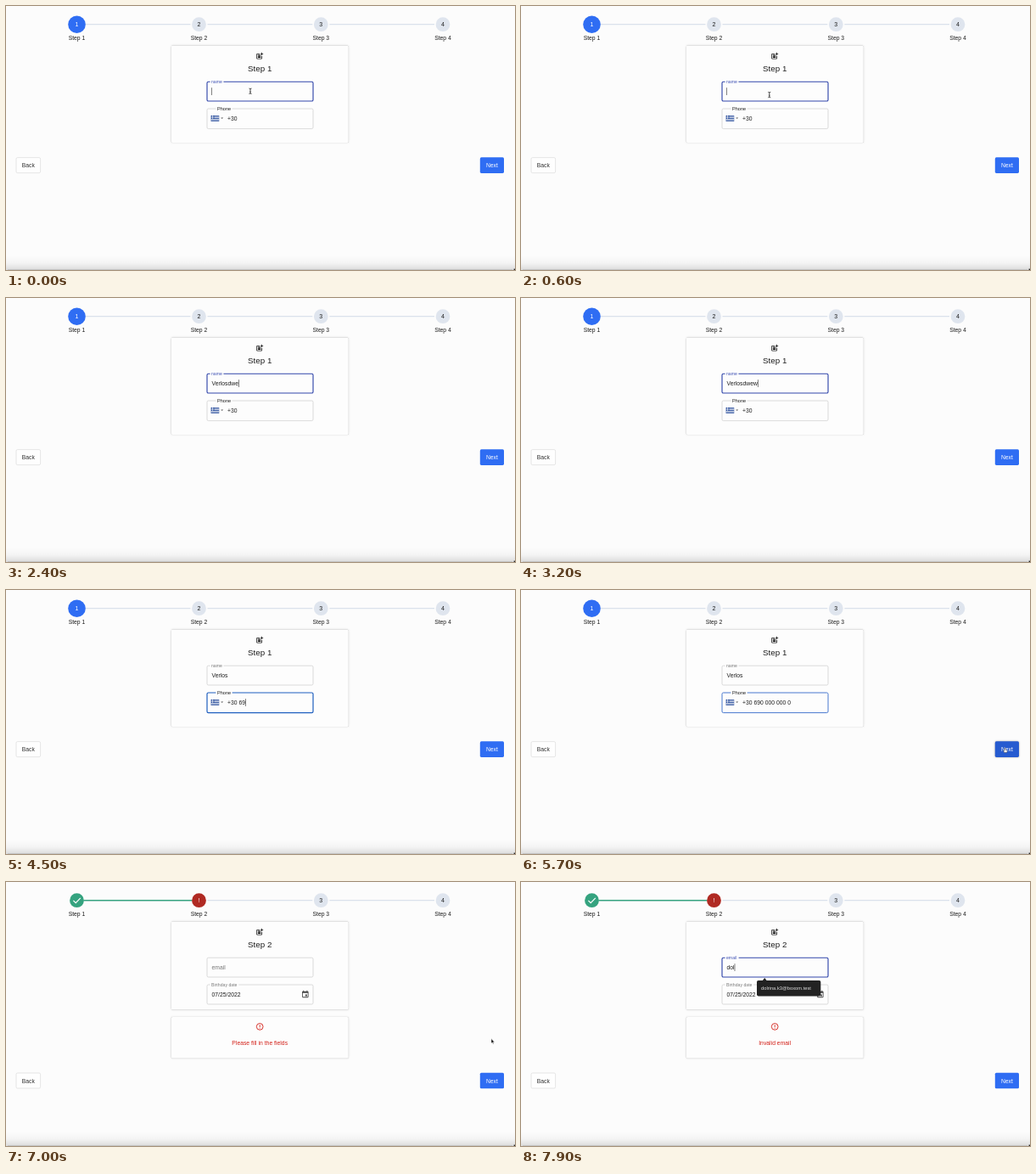
These frames come from a looping animation (600x311 px, 8 s). An HTML page:

```html
<!DOCTYPE html>
<html lang="en">
<head>
<meta charset="utf-8">
<title>Stepper form</title>
<style>
  html, body { margin: 0; width: 100%; height: 100%; overflow: hidden; background: #fcfcfc; }
  svg { display: block; width: 600px; height: 311px; font: 6.75px "Liberation Sans", Arial, sans-serif; letter-spacing: .005em; }
  .paper { fill: #fdfdfd; filter: drop-shadow(0 .6px .4px rgba(0,0,0,.3)) drop-shadow(0 .3px .9px rgba(0,0,0,.14)); }
  .raised { filter: drop-shadow(0 .8px 1px rgba(0,0,0,.35)); }
</style>
</head>
<body>
<svg id="stage" viewBox="0 0 600 311"></svg>
<script>
const LOOP = 8000;
const BLUE = '#2f6df3', HOVER = '#265bd0', INDIGO = '#3247ab', PHONE_BLUE = '#1f5fbf';
const GREEN = '#35a37f', RED = '#b02a23', ERROR = '#d32018', PALE = '#dfe5ee';
const INK = '#1c1c1c', GREY = '#777', BORDER = '#c4c4c4', PAPER = '#fdfdfd';
const STEP_X = [83.5, 227.5, 371.3, 515], STEP_Y = 21.7;

const stage = document.getElementById('stage');

function set(node, attrs) {
  for (const k in attrs) node.setAttribute(k, attrs[k]);
  return node;
}
function add(parent, tag, attrs = {}) {
  return parent.appendChild(set(document.createElementNS('http://www.w3.org/2000/svg', tag), attrs));
}
const group = (parent = stage) => add(parent, 'g');
const rect = (p, x, y, width, height, attrs) => add(p, 'rect', { x, y, width, height, ...attrs });
const path = (p, d, attrs) => add(p, 'path', { d, ...attrs });
function text(p, x, y, str, attrs) {
  const node = add(p, 'text', { x, y, fill: INK, ...attrs });
  node.textContent = str;
  return node;
}
const mid = { 'text-anchor': 'middle' };
const show = (node, on) => node.setAttribute('visibility', on ? 'inherit' : 'hidden');
const clamp = v => Math.max(0, Math.min(1, v));
const last = (table, t) => table.filter(row => row[0] <= t).pop();

// Position on a polyline of [time, x, y]
function along(points, t) {
  let i = points.findIndex(p => p[0] > t);
  if (i < 0) return points[points.length - 1].slice(1);
  if (i === 0) return points[0].slice(1);
  const a = points[i - 1], b = points[i], k = (t - a[0]) / (b[0] - a[0]);
  return [a[1] + (b[1] - a[1]) * k, a[2] + (b[2] - a[2]) * k];
}

// Bottom shade
const defs = add(stage, 'defs');
const shade = add(defs, 'linearGradient', { id: 'shade', x1: 0, y1: 0, x2: 0, y2: 1 });
add(shade, 'stop', { offset: 0, 'stop-color': '#000', 'stop-opacity': 0 });
add(shade, 'stop', { offset: .5, 'stop-color': '#000', 'stop-opacity': .03 });
add(shade, 'stop', { offset: 1, 'stop-color': '#000', 'stop-opacity': .13 });
rect(stage, 0, 294, 600, 17, { fill: 'url(#shade)' });
rect(stage, 2, 310.3, 595, .7, { fill: '#bbb' });
rect(stage, 598.6, 309.6, 1.4, 1.4, { fill: '#222' });

// Stepper
const rails = STEP_X.slice(1).map((x, i) =>
  rect(stage, STEP_X[i] + 10, STEP_Y - .55, x - STEP_X[i] - 20, 1.1, { fill: '#d5dde9' }));
const doneRail = rect(stage, STEP_X[0] + 8, STEP_Y - .75, STEP_X[1] - STEP_X[0] - 16, 1.5, { fill: GREEN });
const dots = STEP_X.map((x, i) => {
  const circle = add(stage, 'circle', { cx: x, cy: STEP_Y, r: 8.4 });
  const num = text(stage, x, STEP_Y + 2.5, i + 1, { ...mid, 'font-size': 7 });
  text(stage, x, 40, 'Step ' + (i + 1), mid);
  return { circle, num };
});
const tick = path(stage, 'M79.4 21.9l2.8 2.8 5.6-5.8', { fill: 'none', stroke: '#fff', 'stroke-width': 1.2 });

function paintDot(i, fill, color, r, label) {
  set(dots[i].circle, { fill, r });
  dots[i].num.setAttribute('fill', color);
  dots[i].num.textContent = label;
}

// Card shared by both steps
const card = rect(stage, 194.8, 46.5, 209, 114.5, { rx: 1.6, class: 'paper' });
path(stage, 'M17 19.2H5V7h7V5H5c-1.1 0-2 .9-2 2v12c0 1.1.9 2 2 2h12c1.1 0 2-.9 2-2v-7h-2zM19 2h-2v3h-3v2h3v3h2V7h3V5h-3zM7 9h8v2H7zM7 12h8v2H7zM7 15h8v2H7z',
  { transform: 'translate(294 53.8) scale(.417)', fill: INK });
const title = text(stage, 299.2, 77, '', { ...mid, 'font-size': 9.75 });

function field(p, y, h, label, labelX, notch) {
  const box = rect(p, 237, y, 125, h, { rx: 1.6, fill: 'none' });
  const gap = rect(p, notch[0], y - 1.2, notch[1] - notch[0], 2.4, { fill: PAPER });
  const tag = text(p, labelX, y + 1.6, label, { 'font-size': 5.1, fill: GREY });
  return { box, gap, tag };
}
function outline(f, color, width) {
  set(f.box, { stroke: color, 'stroke-width': width });
}
function input(p, x, y) {
  return { x, value: text(p, x, y, ''), caret: rect(p, x, y - 6.8, .55, 8.8, { fill: INK }) };
}
function fill(inp, row, t, focused) {
  inp.value.textContent = row[1];
  const w = row[1] ? inp.value.getComputedTextLength() : 0;
  inp.caret.setAttribute('x', inp.x + w + (w ? .1 : -.2));
  show(inp.caret, focused && (t - row[0]) % 1100 < 650);
}

// Step 1
const one = group();
const nameField = field(one, 89.2, 22.8, 'name', 242, [240.6, 256.4]);
const nameInput = input(one, 242.5, 103);
const phoneField = field(one, 121, 23.6, 'Phone', 249, [247.4, 266.6]);
set(phoneField.tag, { 'font-size': 5.5, fill: INK, y: 122.8 });
const flag = add(one, 'g', { transform: 'translate(241.6 129)' });
rect(flag, 0, 0, 9.6, 7, { fill: '#1d4396' });
for (let i = 1; i < 9; i += 2) rect(flag, i < 5 ? 4 : 0, i * .78, i < 5 ? 5.6 : 9.6, .78, { fill: '#fff' });
path(flag, 'M2 0v3.9M0 1.95h4', { stroke: '#fff', 'stroke-width': .75 });
path(one, 'M253.3 131.4h2.8l-1.4 1.7z', { fill: '#555' });
const phoneInput = input(one, 261, 134.9);

// Step 2
const two = group();
const mailField = field(two, 89.2, 22.8, 'email', 242, [240.6, 256.6]);
const mailInput = input(two, 242.5, 103);
const dateField = field(two, 121, 23, 'Birthday date', 242, [240.6, 274.4]);
outline(dateField, BORDER, .6);
text(two, 242.5, 134.9, '07/25/2022');
path(two, 'M17 12h-5v5h5zM16 1v2H8V1H6v2H5C4 3 3 4 3 5v14c0 1 1 2 2 2h14c1 0 2-1 2-2V5c0-1-1-2-2-2h-1V1zM19 19H5V8h14z',
  { transform: 'translate(347.8 127.4) scale(.417)', fill: '#444', 'fill-rule': 'evenodd' });

const alertBox = group();
rect(alertBox, 194.8, 159, 209, 48.8, { rx: 1.6, class: 'paper' });
add(alertBox, 'circle', { cx: 299.2, cy: 170.4, r: 3.85, fill: 'none', stroke: ERROR, 'stroke-width': .9 });
path(alertBox, 'M299.2 168.3v2.6M299.2 171.7v.9', { stroke: ERROR, 'stroke-width': .9 });
const alertText = text(alertBox, 299.2, 192.2, '', { ...mid, fill: ERROR });

// Buttons, drawn for a top edge of 178.3
const buttons = group();
rect(buttons, 12, 178.6, 28.6, 18, { rx: 1.6, fill: '#fefefe', stroke: '#d6d6d6', 'stroke-width': .6 });
text(buttons, 26.3, 190.2, 'Back', { ...mid, fill: '#333' });
const next = rect(buttons, 558.8, 178.3, 28.2, 18.6, { rx: 1.6 });
text(buttons, 572.9, 190.2, 'Next', { ...mid, fill: '#fff' });

// Suggestion bubble
const bubble = group();
path(bubble, 'M284 117l3.2-4 3.2 4z', { fill: '#222' });
rect(bubble, 278, 116, 75.3, 18.4, { rx: 1.8, fill: '#222' });
text(bubble, 283, 127, 'dolrina.k3@boxom.test', { 'font-size': 5.7, fill: '#e2e2e2' });

// Pointers, hot spot at 0,0
const pointers = {
  beam: path(group(), 'M-1.5-3.2Q0-3.2 0-2.2Q0-3.2 1.5-3.2M0-2.5V2.5M-1.5 3.2Q0 3.2 0 2.2Q0 3.2 1.5 3.2M-.7.6H.7',
    { fill: 'none', stroke: '#111', 'stroke-width': .7 }),
  arrow: path(group(), 'M0 0V5.5L1.3 4.4 2.1 6.3 3 5.9 2.2 4.1H3.9z',
    { fill: '#111', stroke: '#fff', 'stroke-width': .5 }),
  hand: path(group(), 'M-.5-2.2Q0-2.7.5-2.2V-.3L2.2.1Q2.8.4 2.6 1.4L2.1 3H-.7L-2 1Q-2 .3-.5 1z',
    { fill: '#fff', stroke: '#333', 'stroke-width': .45 })
};

// Typing tables: [time, value]
function typed(prefix, keys, times, before = 0) {
  let value = prefix;
  return [[before, prefix], ...times.map((t, i) => [t, value += keys[i]])];
}
const NAME = [
  ...typed('', 'Verlosdwew', [670, 770, 970, 1080, 1270, 1420, 2080, 2270, 2380, 2580]),
  [3280, 'Verlosdwe'], [3380, 'Verlosdw'], [3480, 'Verlosd'], [3580, 'Verlos']
];
const PHONE = typed('+30', [' 6', '9', '0', ' 0', '0', '0', ' 0', '0', '0', ' 0'],
  [4280, 4380, 4580, 4680, 4780, 4880, 4980, 5080, 5180, 5280], 3880);
PHONE.unshift([0, '+30']);
const MAIL = typed('', 'dol', [7480, 7580, 7780], 7380);
MAIL.unshift([0, '']);

const POINTER = [[0, 'beam'], [670, ''], [5290, 'beam'], [5370, 'arrow'], [5470, 'hand'],
  [6580, 'arrow'], [7280, 'beam'], [7480, '']];
const TRAIL = [[0, 288, 100.3], [5290, 330, 138], [5480, 562, 185], [5600, 570.5, 188.5],
  [5900, 570.5, 188.5], [6200, 572, 184.6], [7020, 572, 184.6], [7150, 500, 160],
  [7280, 320, 108], [7380, 290, 100.5]];

const PHONE_ON = 3880, PRESS = 5600, STEP2 = 5880, FAIL = 6580, MAIL_ON = 7380;

function draw(t) {
  const first = t < STEP2, failed = t >= FAIL;

  // Stepper
  doneRail.setAttribute('opacity', clamp((t - STEP2) / 250));
  show(tick, !first);
  paintDot(0, first ? BLUE : GREEN, '#fff', first ? 10.3 : 8.4, first ? '1' : '');
  if (first) paintDot(1, PALE, INK, 8.4, '2');
  else if (failed) paintDot(1, RED, '#fff', 8.4, '!');
  else paintDot(1, BLUE, '#fff', 10.3, '2');
  paintDot(2, PALE, INK, 8.4, '3');
  paintDot(3, PALE, INK, 8.4, '4');

  // Cards
  title.textContent = first ? 'Step 1' : 'Step 2';
  card.setAttribute('height', first ? 114.5 : 104);
  show(one, first);
  show(two, !first);
  show(alertBox, failed);
  alertText.textContent = t < MAIL[2][0] ? 'Please fill in the fields' : 'Invalid email';

  // Step 1 fields
  const onName = t < PHONE_ON, onPhone = !onName && t < PRESS;
  outline(nameField, onName ? INDIGO : BORDER, onName ? 1.15 : .6);
  nameField.tag.setAttribute('fill', onName ? '#3f51b5' : GREY);
  if (onName) outline(phoneField, BORDER, .6);
  else outline(phoneField, onPhone ? PHONE_BLUE : '#4878cf', onPhone ? 1.2 : 1);
  fill(nameInput, last(NAME, t), t, first && onName);
  fill(phoneInput, last(PHONE, t), t, first && onPhone);

  // Email field, label floats up on focus
  const onMail = t >= MAIL_ON, k = clamp((t - MAIL_ON + 40) / 160);
  const lift = onMail ? 1 - (1 - k) ** 2 : 0;
  outline(mailField, onMail ? INDIGO : BORDER, onMail ? 1.15 : .6);
  set(mailField.tag, { x: 242.5 - .5 * lift, y: 103 - 12.2 * lift,
    'font-size': 6.75 - 1.65 * lift, fill: onMail ? '#3f51b5' : GREY });
  show(mailField.gap, lift > .5);
  fill(mailInput, last(MAIL, t), t, onMail);
  show(bubble, t >= 7800);

  // Buttons
  const hover = t >= 5470 && !failed;
  buttons.setAttribute('transform', `translate(0 ${first ? 0 : failed ? 46.4 : -10.4})`);
  set(next, { fill: hover ? HOVER : BLUE, class: hover ? 'raised' : '' });

  // Pointer
  const kind = last(POINTER, t)[1], [x, y] = along(TRAIL, t);
  for (const name in pointers) {
    show(pointers[name], name === kind);
    pointers[name].setAttribute('transform', `translate(${x} ${y})`);
  }
}

const start = performance.now();
function frame() {
  draw((performance.now() - start) % LOOP);
  requestAnimationFrame(frame);
}
frame();
</script>
</body>
</html>
```
